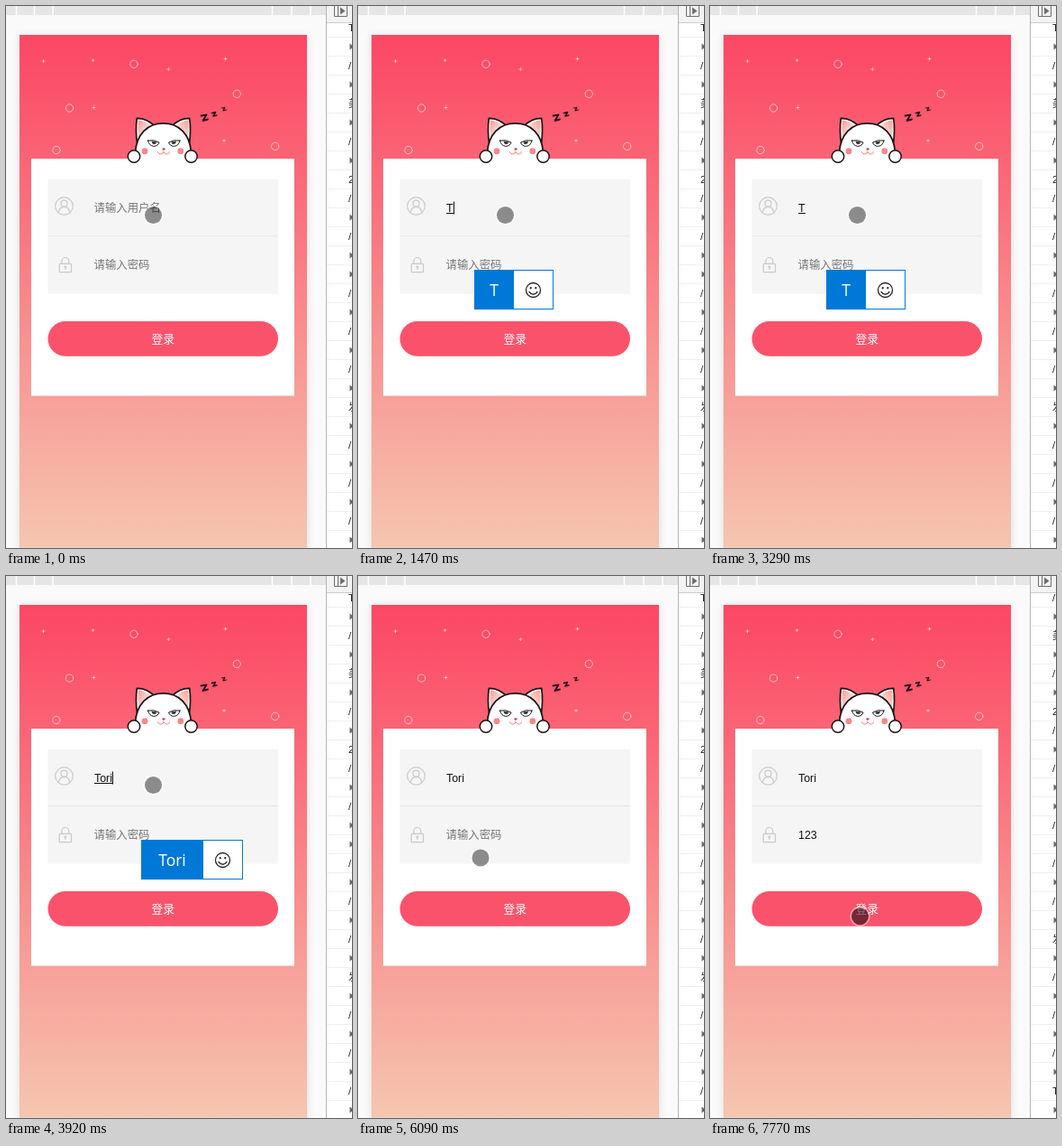
Animation, 384 px wide and 600 px high, one loop 8000 ms. Source, as an HTML page:

```html
<!DOCTYPE html>
<html lang="zh">
<head>
<meta charset="utf-8">
<title>登录</title>
<style>
html, body { margin: 0; width: 384px; height: 600px; overflow: hidden; background: #fafafa; }
svg { display: block; }
text { font-family: "Liberation Sans", "Noto Sans CJK SC", "Noto Sans CJK", sans-serif; font-size: 12.4px; }
.hint { fill: #757575; }
.typed { fill: #111; }
.ime { font-family: "Open Sans", "Noto Sans CJK SC", "Noto Sans CJK", sans-serif; font-size: 17.5px; }
.line { fill: none; stroke-linecap: round; stroke-linejoin: round; }
</style>
</head>
<body>
<svg width="384" height="600" viewBox="0 0 384 600">
  <defs>
    <linearGradient id="sky" x1="0" y1="0" x2="0" y2="1">
      <stop offset="0" stop-color="#fb4865"/>
      <stop offset=".08" stop-color="#fb4f69"/>
      <stop offset="1" stop-color="#f5c6af"/>
    </linearGradient>
    <linearGradient id="ear" x1="0" y1="0" x2="1" y2="1">
      <stop offset="0" stop-color="#f49c94"/>
      <stop offset="1" stop-color="#fff"/>
    </linearGradient>
    <filter id="soft" x="-10%" y="-10%" width="120%" height="120%"><feGaussianBlur stdDeviation="4"/></filter>
    <clipPath id="log"><rect x="356" y="19" width="28" height="581"/></clipPath>
  </defs>

  <rect width="384" height="600" fill="#fafafa"/>
  <rect width="355" height="10" fill="#e5e5e5"/>
  <path d="M11.5 0V10M31.5 0V10M52 0V10M295.500 0V10M317 0V10M338 0V10" stroke="#fff" stroke-width="1.500"/>

  <rect x="15" y="33" width="319" height="570" fill="#000" opacity=".13" filter="url(#soft)"/>
  <rect x="15" y="32" width="319" height="568" fill="url(#sky)"/>
  <rect x="15" y="599" width="319" height="1" fill="#ddd" opacity=".7"/>
  <g id="decor" class="line" stroke="#fff" opacity=".62"></g>

  <rect x="28" y="169" width="292" height="262.500" fill="#fff"/>
  <path d="M28 431.500H320" stroke="#e9d6d6"/>

  <g id="cat" stroke="#1c1414" stroke-width="1.700" class="line">
    <g id="earL">
      <path d="M145.500 152Q143.500 137 145.300 124.300Q156 124 165 133Z" fill="#fff"/>
      <path d="M147.200 146Q145.800 135 146.800 126.500Q154 127 160.500 133Z" fill="url(#ear)" stroke="none"/>
    </g>
    <use href="#earL" transform="matrix(-1 0 0 1 349 0)"/>
    <path d="M143.500 174V164C144 143 156 129.500 174.500 129.500S204.500 143 205 164V174Z" fill="#fff" stroke="none"/>
    <path d="M143.500 162C145 142 157 129.800 174.500 129.800S204 142 205.500 162"/>
    <circle cx="142" cy="166.500" r="6.700" fill="#fff" stroke-width="1.500"/>
    <circle cx="205.500" cy="166.500" r="6.700" fill="#fff" stroke-width="1.500"/>
    <g id="eyeL" stroke-width="1">
      <path d="M157.500 149Q164 147.500 170 151Q168.500 155.300 164 155.300Q159 155 157.500 149Z" fill="#fff"/>
      <path d="M161.500 149.500Q162 153 164.500 153T167 150.500Z" fill="#333" stroke="none"/>
    </g>
    <use href="#eyeL" transform="matrix(-1 0 0 1 350.500 0)"/>
    <g stroke="none" fill="#fb8588">
      <circle cx="154" cy="160.700" r="3.400"/>
      <circle cx="193.800" cy="160.700" r="3.400"/>
      <ellipse cx="175" cy="158.500" rx="1.600" ry="1.400" fill="#f4455c"/>
    </g>
    <path d="M168.500 161.500Q169 164.300 172 164T175 161Q175.500 164 178.500 164T181.500 161.500" stroke="#f08a8a" stroke-width="1"/>
  </g>
  <g class="line" stroke="#2a1218">
    <path d="M216.500 121.500L222.500 120.500L218.500 127L224 125.500" stroke-width="1.900"/>
    <path d="M228.500 118.500L232.500 117.500L230 122L233.800 121" stroke-width="1.600"/>
    <path d="M239.500 113L243 112.300L241 115.800L244.500 115" stroke-width="1.200"/>
  </g>

  <rect x="46.500" y="192" width="255.500" height="126.500" fill="#f5f5f5"/>
  <path d="M46.500 254.500H302" stroke="#e7e7e7"/>
  <g class="line" stroke="#c9c9c9" stroke-width="1.200">
    <circle cx="64.500" cy="221.500" r="9.800"/>
    <circle cx="64.500" cy="218.700" r="3.500"/>
    <path d="M58.500 228Q59 222.500 64.500 222.300T70.500 228"/>
    <rect x="59.300" y="285.300" width="13.200" height="9.400" rx="1"/>
    <path d="M61.800 285V282.500A4 4 0 0 1 69.800 282.500V285M65.900 289V291.500"/>
    <circle cx="65.900" cy="288.800" r=".8"/>
  </g>

  <text id="userHint" class="hint" x="97.500" y="228">请输入用户名</text>
  <text id="passHint" class="hint" x="97.500" y="291">请输入密码</text>
  <text id="user" class="typed" x="98" y="228"></text>
  <text id="pass" class="typed" x="98" y="291"></text>
  <rect id="under" x="98" y="229" height="1" fill="#111"/>
  <rect id="caret" width="1" height="14" fill="#111"/>

  <rect x="46.500" y="349" width="255.500" height="38.700" rx="19.350" fill="#fb526b"/>
  <text x="174.300" y="373" text-anchor="middle" fill="#fff" style="font-size:12.8px">登录</text>

  <rect x="355" y="0" width="29" height="600" fill="#fff"/>
  <g id="rows" clip-path="url(#log)"></g>
  <rect x="355" y="0" width="29" height="18" fill="#f3f3f3"/>
  <path d="M355 18.500H384" stroke="#ccc"/>
  <path d="M355.500 0V600" stroke="#b4b4b4"/>
  <path d="M364.500 0V11.500H378.500V0M368.500 0V11.500" stroke="#6e6e6e" fill="none"/>
  <path d="M371 1.500L376.500 5.500L371 9.500Z" fill="#6e6e6e"/>

  <g id="popup">
    <rect id="bar" y="292.500" height="43" fill="#fff" stroke="#0078d7"/>
    <rect id="pick" y="292" height="44" fill="#0078d7"/>
    <text id="word" class="ime" y="320.500" text-anchor="middle" fill="#fff"></text>
    <text id="more" class="ime" y="320.500" fill="#111"></text>
    <g id="smile" class="line" stroke="#222" stroke-width="1.300">
      <circle r="8"/>
      <path d="M-4.500 2Q0 7.500 4.500 2"/>
      <path d="M-2.800 -2.500V-2.300M2.800 -2.500V-2.300" stroke-width="2.200"/>
    </g>
  </g>
  <g id="touch">
    <circle r="10.300" fill="none" stroke="#fff" stroke-opacity=".5" stroke-width="1.400"/>
    <circle id="dot" r="9.500"/>
  </g>
</svg>
<script>
const LOOP = 8000, STEP = 70, LEFT = 98, NAME = "Tori";
const $ = id => document.getElementById(id);
const set = (id, attrs) => {
  for (const k in attrs) $(id).setAttribute(k, attrs[k]);
};
const show = (id, on) => $(id).setAttribute("visibility", on ? "visible" : "hidden");
const within = (t, spans) => spans.some(([a, b]) => t >= a && t < b);
const last = (t, list) => list.reduce((v, [at, n]) => t >= at ? n : v, 0);

const stars = [[41.5, 61], [96.5, 60], [180.5, 70], [243.5, 58.5], [97.5, 112.5], [242, 149]];
const rings = [[142, 64.3], [70.5, 113], [256.3, 97.3], [56, 159.5], [298.7, 155.3]];
$("decor").innerHTML =
  stars.map(([x, y]) => `<path d="M${x - 1.5} ${y}h3M${x} ${y - 1.5}v3"/>`).join("") +
  rings.map(([x, y]) => `<circle cx="${x}" cy="${y}" r="4.2"/>`).join("");

const log = "T>/>美>/>2/>/>>/>/>/>发>/>/>/>T>";
$("rows").innerHTML = `<g id="lines">${[...log].map((c, i) => {
  const y = 24 + i * 21;
  const mark = c === ">"
    ? `<path d="M381.500 ${y - 3.5}L386 ${y}L381.500 ${y + 3.5}Z" fill="#666"/>`
    : `<text x="380" y="${y + 4}" fill="#222" style="font-size:11.5px">${c}</text>`;
  return mark + `<path d="M356 ${y + 10.5}H384" stroke="#efefef"/>`;
}).join("")}</g>`;

// number of letters in each field, by time
const userKeys = [[560, 1], [1820, 0], [2730, 1], [3570, 2], [3780, 3], [3920, 4]];
const passKeys = [[6300, 1], [6510, 2], [6720, 3]];
const userCaret = [[490, 1050], [1470, 2310], [2730, 3290], [3570, 4550], [4970, 5460]];
const passCaret = [[5670, 6090], [6300, 7210], [7630, 7700]];
const popupOn = [[630, 1820], [2800, 4060]];
const composing = [[560, 1820], [2730, 4130]];
const pressed = [[350, 490], [2450, 2940], [5460, 5530], [7630, 8000]];
const path = [
  [0, 163.5, 231.5], [4900, 163.5, 231.5], [5180, 152.3, 252.5], [5390, 139, 327], [5460, 136, 312],
  [6860, 136, 312], [6930, 169.5, 331.5], [7000, 172, 345], [7140, 170, 374], [7210, 167, 381],
  [7280, 167, 381], [7350, 159.5, 380], [7490, 166.5, 376.7], [LOOP, 166.5, 376.7]
];
// popup left edge and width of the chosen word, by letter count
const boxes = [[129, 44], [129, 44], [132, 54], [143, 62], [150, 69]];

function cursorAt(t) {
  const i = path.findIndex(p => p[0] > t);
  const [a, ax, ay] = path[i - 1], [b, bx, by] = path[i];
  const k = (t - a) / (b - a);
  return [ax + (bx - ax) * k, ay + (by - ay) * k];
}

function draw(t) {
  t = Math.floor(t / STEP) * STEP;
  const n = last(t, userKeys), m = last(t, passKeys);
  $("user").textContent = NAME.slice(0, n);
  $("pass").textContent = "123".slice(0, m);
  show("userHint", !n);
  show("passHint", !m);

  const width = id => $(id).textContent ? $(id).getComputedTextLength() : 0;
  const inPass = t >= 5530;
  const end = Math.round(LEFT + width(inPass ? "pass" : "user"));
  set("caret", { x: end, y: inPass ? 280 : 216.5 });
  show("caret", within(t, inPass ? passCaret : userCaret));
  set("under", { width: Math.max(0, end - LEFT) });
  show("under", within(t, composing));

  const [x, w] = boxes[n], wide = n === 2 || n === 3;
  show("popup", within(t, popupOn));
  set("bar", { x: x + .5, width: wide ? 300 : w + 43 });
  set("pick", { x, width: w });
  $("word").textContent = NAME.slice(0, n);
  set("word", { x: x + w / 2 });
  $("more").textContent = !wide ? "" : n === 2 ? "投 \u2003头 \u2003图 \u2003偷 \u2003团" : "投入 \u2003投 \u2003头 \u2003偷";
  set("more", { x: x + w + 14 });
  set("smile", { transform: `translate(${wide ? 450 : x + w + 21.5} 314.5)` });

  set("touch", { transform: `translate(${cursorAt(t)})` });
  set("dot", { "fill-opacity": within(t, pressed) ? .52 : .43 });
  set("lines", { transform: `translate(0 ${t >= 7700 ? -42 : 0})` });
}

const start = performance.now();
function tick() {
  draw((performance.now() - start) % LOOP);
  requestAnimationFrame(tick);
}
tick();
</script>
</body>
</html>
```
